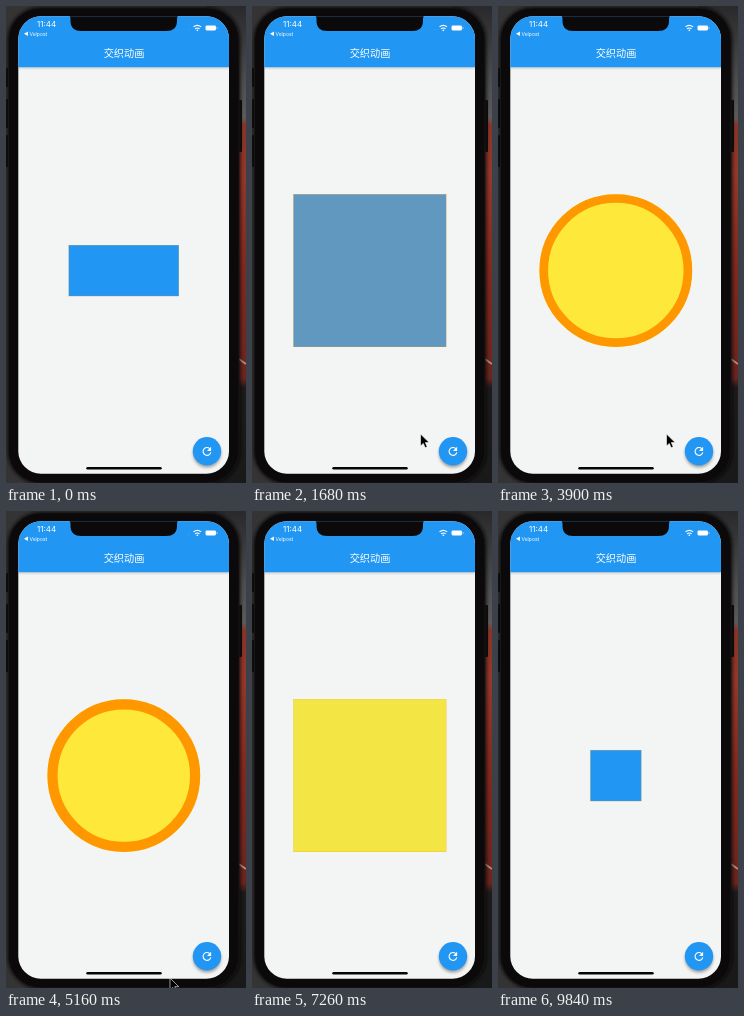
An HTML page for the animation above (9900 ms loop, 240 px wide and 477 px high).

```html
<!DOCTYPE html>
<html lang="zh">
<head>
<meta charset="utf-8">
<style>
html, body { margin: 0; width: 100%; height: 100%; overflow: hidden; background: #222; }
svg { display: block; width: 100vw; height: 100vh; }
text { font-family: "Inter", "Noto Sans CJK SC", "Noto Sans CJK", sans-serif; fill: #fff; }
</style>
</head>
<body>
<svg viewBox="0 0 240 477">
  <defs>
    <linearGradient id="backdrop" x2="0" y2="1">
      <stop offset="0" stop-color="#29292b"/>
      <stop offset=".15" stop-color="#4c4c4e"/>
      <stop offset=".235" stop-color="#5c5a5b"/>
      <stop offset=".25" stop-color="#8a3226"/>
      <stop offset=".35" stop-color="#93382a"/>
      <stop offset=".55" stop-color="#80291f"/>
      <stop offset=".78" stop-color="#6a251e"/>
      <stop offset=".8" stop-color="#1c1a1b"/>
      <stop offset="1" stop-color="#1a1919"/>
    </linearGradient>
    <clipPath id="screen"><rect x="12.300" y="10.300" width="210.700" height="457.400" rx="22.500"/></clipPath>
    <filter id="soft" x="-50%" y="-50%" width="200%" height="200%"><feGaussianBlur stdDeviation="1.800"/></filter>
  </defs>

  <rect width="240" height="477" fill="#343435"/>
  <rect x="200" width="40" height="477" fill="url(#backdrop)"/>
  <path d="M233 353l7 5" stroke="#b08f88" stroke-width="1.800"/>
  <rect x="2.500" y="2" width="231" height="475" rx="32" fill="none" stroke="#000" stroke-width="3" opacity=".6" filter="url(#soft)"/>
  <g fill="#0c0c0d">
    <rect x="0" y="62" width="4" height="19" rx="1"/>
    <rect x="0" y="93" width="4" height="29" rx="1"/>
    <rect x="0" y="129" width="4" height="32" rx="1"/>
    <rect x="231" y="94" width="5" height="52" rx="1"/>
  </g>
  <rect x="2.500" y="2" width="230.500" height="475" rx="32" fill="#0b0909" stroke="#181717"/>

  <g clip-path="url(#screen)">
    <rect x="12" y="10" width="211" height="458" fill="#f3f5f5"/>
    <rect x="12" y="59" width="211" height="3" opacity=".22" filter="url(#soft)"/>
    <rect x="12" y="10" width="211" height="51.200" fill="#2196f3"/>
    <path d="M61 9q3.500 0 3.500 4v2q0 10 11 10h84.500q11 0 11-10v-2q0-4 3.500-4z" fill="#0b0909"/>
    <text x="31" y="21" font-size="8">11:44</text>
    <path d="M22 25.500v4.600l-4-2.300z" fill="#fff"/>
    <text x="23.500" y="29.800" font-size="5">Velpost</text>
    <circle cx="183" cy="23.500" r=".5" fill="#fff" opacity=".25"/>
    <path d="M187.500 20.900q3.800-3.200 7.600 0M189 22.900q2.300-1.800 4.600 0" fill="none" stroke="#fff" stroke-width="1.200"/>
    <path d="M190.100 23.900q1.200-.9 2.400 0l-1.200 1.400z" fill="#fff"/>
    <rect x="199.500" y="19.600" width="10.500" height="4.800" rx="1.300" fill="#fff"/>
    <rect x="210.500" y="21" width="1" height="2" fill="#fff" opacity=".5"/>
    <text x="118" y="51.300" font-size="10.200" font-weight="500" text-anchor="middle">交织动画</text>

    <rect id="fill"/>
    <rect id="border" fill="none" stroke="#ff9800"/>

    <circle cx="201" cy="447.500" r="14" opacity=".35" filter="url(#soft)"/>
    <circle cx="201" cy="445.200" r="14.200" fill="#2196f3"/>
    <path d="M203.700 442.600a3.900 3.900 0 1 0 1.100 3.700" fill="none" stroke="#fff" stroke-width="1.100"/>
    <path d="M205.100 440.800v4.100h-4.100z" fill="#fff"/>
    <rect x="80.300" y="461" width="75.400" height="2.400" rx="1.200" fill="#050505"/>
  </g>

  <path id="cursor" d="M0 0v12l2.800-2.600 1.900 4.300 2-.9-1.900-4.200h3.900z" stroke="#fff" stroke-width=".6"/>
</svg>

<script>
const LOOP = 9900, PHASE = 925;
const FORWARD_START = -310, REVERSE_END = 9770;
const SMALL = 51, LARGE = 152.8;
const CENTER = { x: 117.8, y: 264.6 };
const COLORS = [[0, 33, 150, 243], [0.2, 100, 152, 188], [0.6, 166, 201, 133], [1, 254, 233, 58]];
const byId = id => document.getElementById(id);
const clamp = x => Math.min(1, Math.max(0, x));
const lerp = (a, b, k) => a + (b - a) * k;

function setAttrs(el, attrs) {
  for (const name in attrs) el.setAttribute(name, attrs[name]);
}

// cubic-bezier(.25, .1, .25, 1)
function ease(x) {
  let lo = 0, hi = 1;
  for (let i = 0; i < 20; i++) {
    const s = (lo + hi) / 2, r = 1 - s;
    if (0.75 * r * s + s ** 3 < x) lo = s; else hi = s;
  }
  const s = (lo + hi) / 2, r = 1 - s;
  return 0.3 * r * r * s + 3 * r * s * s + s ** 3;
}

function colorAt(k) {
  const i = Math.max(1, COLORS.findIndex(c => c[0] >= k));
  const [a, b] = [COLORS[i - 1], COLORS[i]];
  const f = (k - a[0]) / (b[0] - a[0]);
  return `rgb(${[1, 2, 3].map(n => Math.round(lerp(a[n], b[n], f)))})`;
}

function box(w, h, radius, inset) {
  return {
    x: CENTER.x - w / 2 + inset, y: CENTER.y - h / 2 + inset,
    width: w - 2 * inset, height: h - 2 * inset, rx: Math.max(0, radius - inset)
  };
}

function draw(t) {
  const progress = Math.min(t - FORWARD_START, REVERSE_END - t) / PHASE;
  const stage = n => { const x = clamp(progress - n); return x === 0 || x === 1 ? x : ease(x); };
  const w = lerp(SMALL, LARGE, stage(0)), h = lerp(SMALL, LARGE, stage(1));
  const radius = LARGE / 2 * stage(3), line = Math.max(0.2, 10.2 * stage(4));
  setAttrs(byId("fill"), { ...box(w, h, radius, 0), fill: colorAt(stage(2)) });
  setAttrs(byId("border"), { ...box(w, h, radius, line / 2), "stroke-width": line });

  const enter = ease(clamp((t - 1250) / 350)), leave = ease(clamp((t - 4980) / 400));
  const away = 1 - enter + leave;
  setAttrs(byId("cursor"), { transform: `translate(${168.5 - 6 * away} ${428 + 52 * away})` });
}

function tick() {
  draw(performance.now() % LOOP);
  requestAnimationFrame(tick);
}
tick();
</script>
</body>
</html>
```
